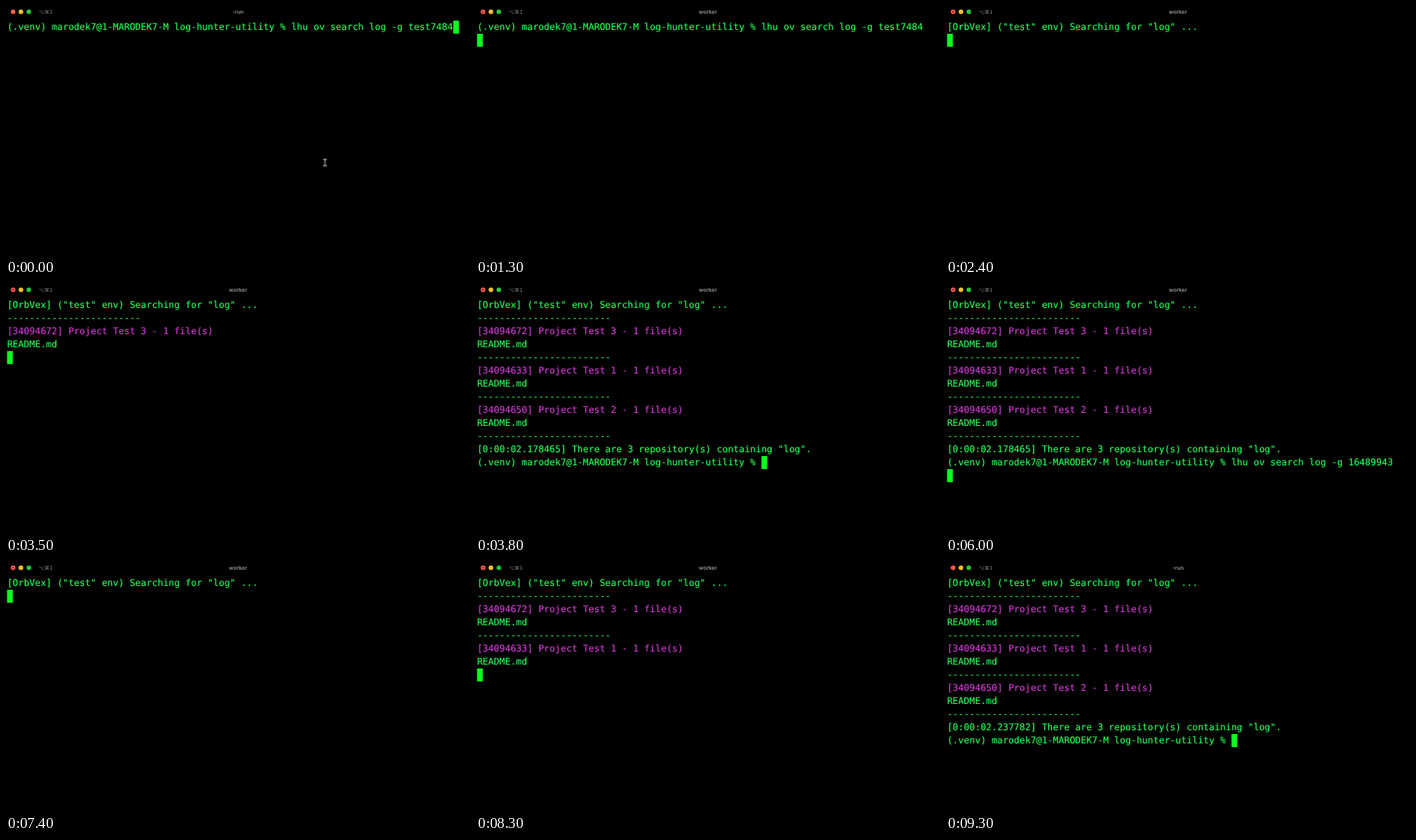
An HTML page that plays this animation: 600 px wide and 324 px high, repeating every 9400 ms.

```html
<!DOCTYPE html>
<html lang="en">
<head>
<meta charset="utf-8">
<title>Terminal</title>
<style>
  html, body { margin: 0; width: 100%; height: 100%; overflow: hidden; background: #000; }
  svg { display: block; width: 100vw; height: 100vh; }
  text { white-space: pre; text-rendering: geometricPrecision; }
  #screen { font: 11.98px "DejaVu Sans Mono", monospace; stroke-width: .15; }
  #title { font: 600 6.9px Inter, sans-serif; fill: #9a9a9a; text-anchor: middle; }
  #tab { font: 6.4px "DejaVu Sans", sans-serif; fill: #8a8a8a; }
</style>
</head>
<body>
<svg viewBox="0 0 600 324">
  <rect width="600" height="324" fill="#000"/>
  <circle cx="9.2" cy="7.5" r="3" fill="#ff5b52"/>
  <circle cx="19.3" cy="7.5" r="3" fill="#f6bd2e"/>
  <circle cx="29.5" cy="7.5" r="3" fill="#29c53f"/>
  <circle id="busy" cx="9.2" cy="7.5" r="1" fill="#7a0a08"/>
  <text id="tab" x="42.5" y="9.8">⌥⌘1</text>
  <text id="title" x="300" y="10"></text>
  <rect id="mark" fill="#11ff33" height="16.8"/>
  <rect id="cursor" fill="#0dff20" width="7.4" height="16.8"/>
  <g id="screen"></g>
  <g id="pointer" transform="translate(412.5 203)" fill="none">
    <path d="M-2.2 -4H2.2M-2.2 4H2.2M0 -4V4" stroke="#b0b0b0" stroke-width="1.8"/>
    <path d="M-1.8 -4H1.8M-1.8 4H1.8M0 -4V4" stroke="#222" stroke-width=".6"/>
  </g>
</svg>
<script>
const LOOP = 9400, CHAR = 7.212, ROW = 17, LEFT = 1.4, TOP = 19;
const ROWS = 14, GREEN = '#22ff55', MAGENTA = '#d63ad8';
const el = id => document.getElementById(id);

const prompt = '(.venv) marodek7@1-MARODEK7-M log-hunter-utility % ';
const command = 'lhu ov search log -g ';
const rule = '-'.repeat(24);
const header = '[OrbVex] ("test" env) Searching for "log" ...';
const projects = [['34094672', 3], ['34094633', 1], ['34094650', 2]];

const runs = [
  { clear: 1400, found: [3400, 3600, 3700], done: 3800, took: '178465' },
  { clear: 6100, found: [8100, 8300, 8500], done: 8700, took: '237782' }
];
const PASTE = 4700, ENTER = [400, 5300];
const BUSY = [[900, 4300], [5700, 9300]];

const lines = Array.from({ length: ROWS }, (_, i) => {
  const line = document.createElementNS('http://www.w3.org/2000/svg', 'text');
  line.setAttribute('x', LEFT);
  line.setAttribute('y', TOP + 12.3 + i * ROW);
  el('screen').append(line);
  return line;
});
const marked = document.createElementNS('http://www.w3.org/2000/svg', 'tspan');
paint(marked, '#000');

function paint(node, color) {
  node.setAttribute('fill', color);
  node.setAttribute('stroke', color);
}

function results(run, t) {
  const out = [header];
  projects.forEach(([id, n], i) => {
    if (t >= run.found[i]) {
      out.push(rule, `[${id}] Project Test ${n} - 1 file(s)`, 'README.md');
    }
  });
  if (t >= run.done) {
    out.push(rule, `[0:00:02.${run.took}] There are 3 repository(s) containing "log".`, prompt);
  }
  return out;
}

function content(t) {
  if (t < runs[0].clear) {
    const out = [prompt + command + 'test7484'];
    return t < ENTER[0] ? out : [...out, ''];
  }
  const run = t < runs[1].clear ? runs[0] : runs[1];
  const out = results(run, t);
  if (run === runs[0] && t >= PASTE) {
    out[out.length - 1] += command + '16489943';
    if (t >= ENTER[1]) out.push('');
  } else if (t < run.done) {
    out.push('');
  }
  return out;
}

function place(node, col, row) {
  node.setAttribute('x', LEFT + col * CHAR);
  node.setAttribute('y', TOP + row * ROW);
}

function draw(t) {
  const out = content(t), last = out.length - 1;
  lines.forEach((line, i) => {
    const text = out[i] || '';
    line.textContent = text;
    paint(line, /^\[\d{8}\]/.test(text) ? MAGENTA : GREEN);
  });

  const pasted = t >= PASTE && t < ENTER[1];
  if (pasted) {
    marked.textContent = out[last].slice(prompt.length);
    lines[last].textContent = prompt;
    lines[last].append(marked);
  }
  el('mark').setAttribute('width', pasted ? (out[last].length - prompt.length) * CHAR : 0);
  place(el('mark'), prompt.length, last);
  place(el('cursor'), out[last].length, last);

  const busy = BUSY.some(([from, to]) => t >= from && t < to);
  el('title').textContent = busy ? 'worker' : '-run';
  el('busy').style.display = busy ? '' : 'none';
  el('pointer').style.display = t < ENTER[0] ? '' : 'none';
}

const start = performance.now();
function tick() {
  draw((performance.now() - start) % LOOP);
  requestAnimationFrame(tick);
}
tick();
</script>
</body>
</html>
```
